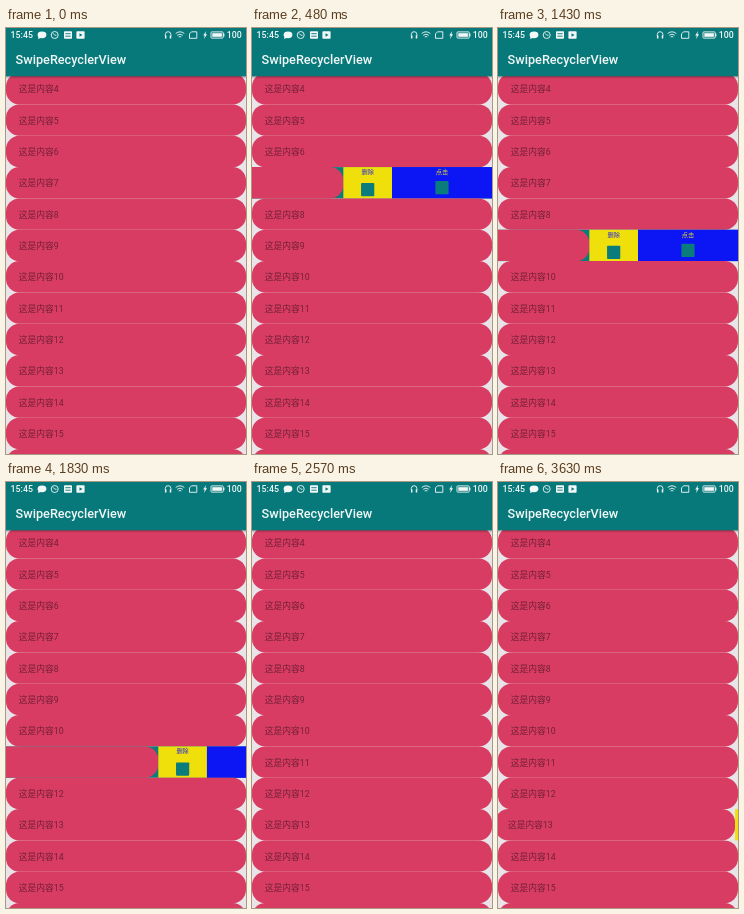
These frames come from a looping animation (240 by 426 pixels, 3760 ms). An HTML page:

```html
<!DOCTYPE html>
<html lang="zh-CN">
<head>
<meta charset="utf-8">
<title>SwipeRecyclerView</title>
<style>
  html, body { margin: 0; width: 100%; height: 100%; overflow: hidden; background: #e8e4e7; }
  svg { display: block; width: 100vw; height: 100vh; }
  text { font-family: Roboto, "Noto Sans CJK SC", "Noto Sans CJK", sans-serif; }
  .label { font-size: 8.75px; fill: #742038; }
  .menu { font-size: 6.2px; text-anchor: middle; }
  .status { font-size: 8.8px; font-weight: 500; fill: #f2f8f8; }
  .title { font-size: 12.7px; font-weight: 500; fill: #f2f8f8; }
</style>
</head>
<body>
<svg id="stage" viewBox="0 0 240 426" preserveAspectRatio="none">
  <defs>
    <linearGradient id="shade" x1="0" y1="0" x2="0" y2="1">
      <stop offset="0" stop-color="#000" stop-opacity=".28"/>
      <stop offset="1" stop-color="#000" stop-opacity="0"/>
    </linearGradient>
  </defs>
  <g id="list"></g>
  <rect y="48" width="240" height="3" fill="url(#shade)"/>
  <rect width="240" height="48.3" fill="#08797a"/>
  <text class="title" x="9.6" y="35.8">SwipeRecyclerView</text>
  <text class="status" x="4.6" y="10.2">15:45</text>
  <text class="status" x="220.8" y="10.2">100</text>
  <g fill="#f2f8f8">
    <ellipse cx="36" cy="6.8" rx="4.4" ry="3.4"/>
    <path d="M32.5 8l-.4 3 3-1.200z"/>
    <rect x="58" y="3.3" width="8" height="7.4" rx=".8"/>
    <rect x="70.4" y="3.3" width="8.2" height="7.4" rx=".8"/>
    <path d="M200.2 3l-3 4.5h1.6l-.8 3.5 3-4.7h-1.6z"/>
    <rect x="206.3" y="5.2" width="9.6" height="3.6"/>
    <rect x="217.2" y="5.6" width="1.2" height="2.8"/>
  </g>
  <path d="M59.3 5.7h5.4M59.3 8.200h5.400" stroke="#08797a" stroke-width=".9"/>
  <path d="M73.5 5.200l3 1.800-3 1.800z" fill="#08797a"/>
  <g fill="none" stroke="#f2f8f8" stroke-width=".9">
    <circle cx="48.7" cy="7" r="3.5"/>
    <path d="M47 5.300l1.800 1.900h1.700"/>
    <path d="M159.300 8V6.500a2.800 2.800 0 0 1 5.600 0V8"/>
    <path d="M159.700 7.400v3M164.500 7.400v3" stroke-width="1.500"/>
    <path d="M169.700 5.500q4.300-3.400 8.600 0M171.200 7.300q2.800-2.200 5.600 0M172.700 9q1.300-1 2.600 0"/>
    <path d="M185.500 3.800h5.300v6.500h-7.300v-4.400z"/>
    <rect x="205" y="3.900" width="12.200" height="6.200" rx=".8"/>
  </g>
</svg>
<script>
const LOOP = 3760, STEP = 68;
const FIRST = 4, LAST = 16, TOP = 45.1;
const DP = 2 / 3;
const PITCH = 47 * DP, RADIUS = 20 * DP;
const DELETE_W = 73 * DP, CLICK_W = 150 * DP, REACH = DELETE_W + CLICK_W;
const OPEN_STEPS = 7, OPEN_POWER = 2.65;
const TEAL = '#0a7c7b';

// Opening and closing times in ms; keep is the share left after each closing step
const swipes = {
  7: { open: 70, close: 940, keep: 0.14 },
  9: { open: 1020, close: 1690, keep: 0.14 },
  11: { open: 1760, close: 2570, keep: 0 },
  13: { open: 2640, close: 3500, keep: 0.14 }
};

const list = document.getElementById('list');

function add(parent, tag, attrs, text) {
  const el = document.createElementNS('http://www.w3.org/2000/svg', tag);
  for (const key in attrs) el.setAttribute(key, attrs[key]);
  if (text) el.textContent = text;
  return parent.appendChild(el);
}

function addAction(parent, x, width, drop, label, back, ink) {
  const mid = x + width / 2;
  add(parent, 'rect', { x, width, height: PITCH, fill: back });
  add(parent, 'text', { x: mid, y: 7, class: 'menu', fill: ink }, label);
  add(parent, 'rect', { x: mid - 6.6, y: 14 + drop, width: 13.2, height: 13.2, rx: 0.8, fill: TEAL });
}

function makeRow(n) {
  const row = add(list, 'g', { transform: `translate(0 ${TOP + (n - FIRST) * PITCH})` });
  const back = add(row, 'rect', { width: 240, height: PITCH, fill: TEAL, visibility: 'hidden' });
  const slider = add(row, 'g', {});
  add(slider, 'rect', { width: 240, height: PITCH, rx: RADIUS, fill: '#d83c62' });
  add(slider, 'text', { x: 12.8, y: 19.2, class: 'label' }, '这是内容' + n);
  if (swipes[n]) {
    addAction(slider, 240, DELETE_W, 2, '删除', '#efe00c', '#2a2ad8');
    addAction(slider, 240 + DELETE_W, CLICK_W, 0, '点击', '#0c16f4', '#f0e020');
  }
  return { swipe: swipes[n], back, slider };
}

const rows = [];
for (let n = FIRST; n <= LAST; n++) rows.push(makeRow(n));
const movers = rows.filter(row => row.swipe);

const stepsSince = (start, t) => Math.floor((t - start) / STEP) + 1;

function shiftAt({ open, close, keep }, t) {
  if (t < open) return 0;
  if (t < close) {
    const p = Math.min(1, stepsSince(open, t) / OPEN_STEPS);
    return REACH * (1 - (1 - p) ** OPEN_POWER);
  }
  const rest = REACH * keep ** stepsSince(close, t);
  return rest < 1 ? 0 : rest;
}

function draw() {
  const t = performance.now() % LOOP;
  for (const { swipe, back, slider } of movers) {
    const shift = shiftAt(swipe, t);
    slider.setAttribute('transform', `translate(${-shift} 0)`);
    back.setAttribute('visibility', shift > 8 ? 'visible' : 'hidden');
  }
  requestAnimationFrame(draw);
}
draw();
</script>
</body>
</html>
```
